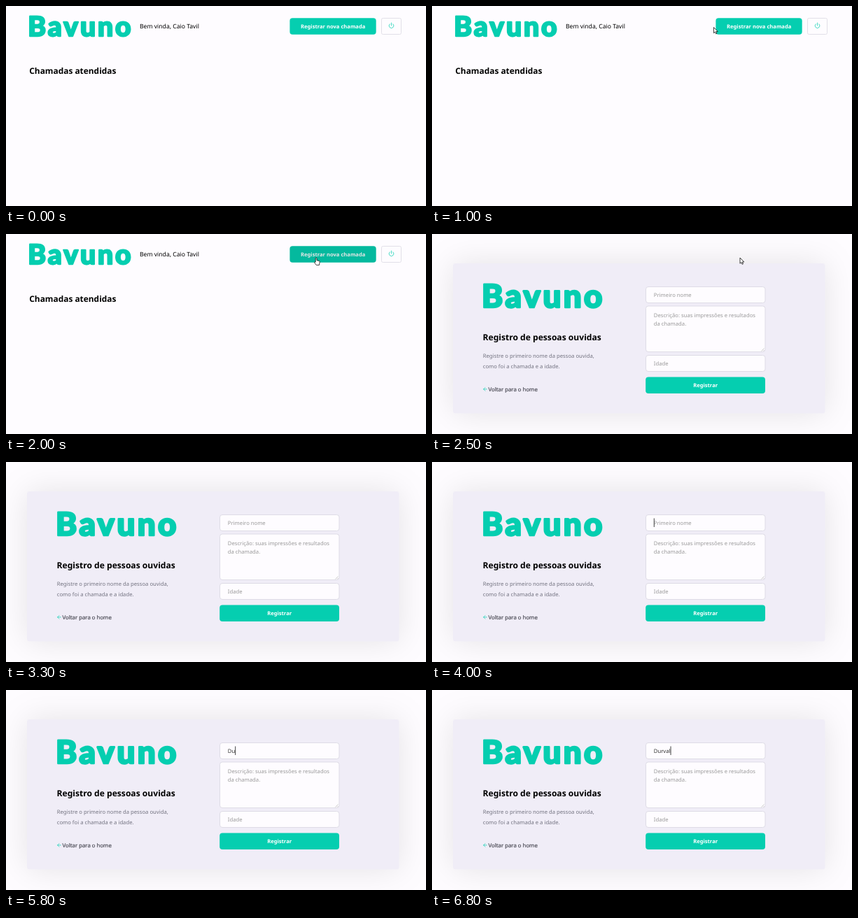
Animation, 600 px wide and 286 px high, one loop 7 s. Source, as an HTML page:

```html
<!DOCTYPE html>
<html lang="pt">
<head>
<meta charset="utf-8">
<title>Registro de chamadas</title>
<style>
html, body { margin: 0; width: 100%; height: 100%; overflow: hidden; background: #fefcff; }
svg { display: block; width: 600px; height: 286px; }
text { font: 7.7px "Noto Sans", sans-serif; text-rendering: geometricPrecision; }
text.logo {
  font: 800 39px Lato, sans-serif; letter-spacing: .075em; fill: #05ceb0;
  stroke: #05ceb0; stroke-width: .06em; stroke-linejoin: round;
}
text.title { font-size: 12px; font-weight: 700; }
text.label { font-size: 7.6px; font-weight: 700; fill: #fff; text-anchor: middle; }
.grey { fill: #737380; }
.hint { fill: #999; }
.teal { fill: #05ceb0; }
.field rect { fill: #fefcff; stroke: #dedce6; }
.icon { fill: none; stroke: #05ceb0; stroke-width: 2; stroke-linecap: round; stroke-linejoin: round; }
.pointer { fill: #fff; stroke: #111; stroke-width: .8; stroke-linejoin: round; }
#panel { fill: #f0edf7; filter: drop-shadow(0 0 23px rgba(0, 0, 0, .1)); }
</style>
</head>
<body>
<svg viewBox="0 0 600 286">
  <g id="home">
    <text class="logo" x="31.3" y="43">Bavuno</text>
    <text x="191" y="32" style="font-size:8.6px">Bem vinda, Caio Tavil</text>
    <g id="call">
      <rect class="teal" x="405.4" y="17.2" width="123.3" height="23.6" rx="4"/>
      <text class="label" x="467.2" y="31.7">Registrar nova chamada</text>
    </g>
    <rect x="536.5" y="17.5" width="28" height="23" rx="2" fill="none" stroke="#e2e0e8"/>
    <path class="icon" transform="translate(546.1 23.4) scale(.37)" d="M18.4 6.6a9 9 0 1 1-12.8 0M12 2v10"/>
    <text class="title" x="33.3" y="96.6" style="font-size:11.9px">Chamadas atendidas</text>
  </g>

  <g id="form">
    <rect id="panel" x="30" y="42" width="531.5" height="214.5" rx="3.5"/>
    <text class="logo" x="71" y="104.9" style="font-size:45.7px">Bavuno</text>
    <text class="title" x="72.5" y="151.8" style="font-size:12.1px">Registro de pessoas ouvidas</text>
    <text class="grey" x="72.7" y="176.8">Registre o primeiro nome da pessoa ouvida,</text>
    <text class="grey" x="72.7" y="191.8">como foi a chamada e a idade.</text>
    <path class="icon" transform="translate(71.9 217.8) scale(.34)" d="M19 12H5M12 19l-7-7 7-7"/>
    <text x="80.5" y="224.8" fill="#4c4c56" stroke="#4c4c56" stroke-width=".2" style="font-size:7.8px">Voltar para o home</text>
    <g class="field">
      <rect x="305.5" y="75.5" width="170.5" height="23" rx="3.5"/>
      <rect x="305.5" y="103" width="170.5" height="65.5" rx="3.5"/>
      <rect x="305.5" y="173.5" width="170.5" height="23" rx="3.5"/>
    </g>
    <path d="M470.5 167.5l4-4M473 167.5l1.5-1.5" stroke="#aaa" stroke-width=".6"/>
    <text id="hint" class="hint" x="316.8" y="89.7">Primeiro nome</text>
    <text id="typed" x="316.8" y="89.7" fill="#333"></text>
    <rect id="caret" y="80.5" width="1" height="12.5" fill="#444"/>
    <text class="hint" x="316.8" y="119.3">Descrição: suas impressões e resultados</text>
    <text class="hint" x="316.8" y="130.8">da chamada.</text>
    <text class="hint" x="316.8" y="187.7">Idade</text>
    <rect class="teal" x="305.2" y="204.6" width="170.8" height="23.4" rx="4"/>
    <text class="label" x="390.7" y="219.1">Registrar</text>
  </g>

  <path id="arrow" class="pointer" d="M0 0V8.2L1.9 6.5 3.1 9.3 4.5 8.7 3.3 6H5.8Z"/>
  <path id="hand" class="pointer" d="M1.8 6.7V1Q2.7-.3 3.6 1V4.3L7.2 5.2Q8 5.5 7.8 6.5L7.1 11H2.9L.3 7.7Q-.1 6.4 1.8 6.7Z"/>
</svg>
<script>
const $ = id => document.getElementById(id);
const NAME = "Durval";
const LOOP = 7000;

// Latest [time, ...values] entry that has started
const at = (steps, t) => steps.filter(s => s[0] <= t).pop();
const show = (id, on) => $(id).style.display = on ? "" : "none";

const pointer = [
  [0, ""],
  [500, "arrow", 372.5, 16.5],
  [800, "arrow", 401, 30.5],
  [1000, "arrow", 402.5, 30.5],
  [1300, "hand", 440.4, 32.6],
  [1500, "hand", 440.4, 33.4],
  [2500, "arrow", 440, 34],
  [3000, "arrow", 425.6, 54.4],
  [3300, ""]
];
const hover = [[0, 1], [1300, .95], [1500, .9]];
const caret = [[0, false], [4000, true], [4500, false], [5500, true]];
const letters = [[0, 0], [5000, 1], [5800, 2], [6000, 3], [6300, 4], [6500, 5], [6800, 6]];

function draw(t) {
  show("home", t < 2500);
  show("form", t >= 2500);
  $("call").style.filter = `brightness(${at(hover, t)[1]})`;

  const [, kind, x, y] = at(pointer, t);
  for (const id of ["arrow", "hand"]) {
    show(id, id === kind);
    if (id === kind) $(id).setAttribute("transform", `translate(${x} ${y})`);
  }

  const count = at(letters, t)[1];
  $("typed").textContent = NAME.slice(0, count);
  show("hint", !count);
  show("caret", at(caret, t)[1]);
  const width = count ? $("typed").getComputedTextLength() : 0;
  $("caret").setAttribute("x", 316.8 + width);
}

function frame() {
  draw(performance.now() % LOOP);
  requestAnimationFrame(frame);
}
frame();
</script>
</body>
</html>
```
